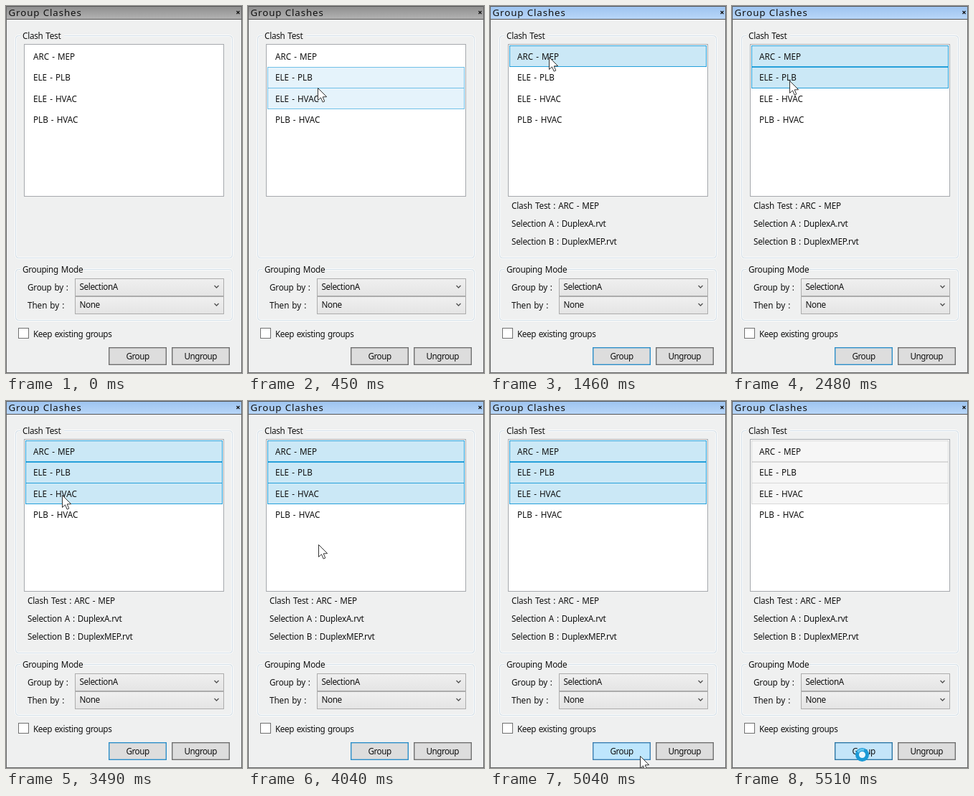
An HTML page with a canvas for the animation above (5590 ms loop, 329 by 512 pixels).

```html
<!DOCTYPE html>
<html lang="en">
<head>
<meta charset="utf-8">
<title>Group Clashes</title>
<style>
html, body { margin: 0; width: 100%; height: 100%; overflow: hidden; background: #eff0f0; }
canvas { display: block; width: 329px; height: 512px; }
</style>
</head>
<body>
<canvas id="stage" width="329" height="512"></canvas>
<script>
const ctx = document.getElementById('stage').getContext('2d');
const LOOP = 5590;
const ROWS = ['ARC - MEP', 'ELE - PLB', 'ELE - HVAC', 'PLB - HVAC'];
const ROW_TOPS = [55, 85, 114, 144];
const SELECT_TIMES = [1460, 2480, 3490, Infinity];
const ACTIVATE = 1460, PRESS = 5210, BUSY = 5510;

const easeOut = u => 1 - (1 - u) ** 2.4;
const linear = u => u;
const soft = u => (u + u * u * (3 - 2 * u)) / 2;

// Each move shows `steps` poses, the first at `start` and the last at `end`.
const MOVES = [
  { start: 130, end: 680, steps: 8, from: [184, 404], to: [84, 70], ease: easeOut, shown: true },
  { start: 760, end: 760, steps: 1, to: [82, 71] },
  { start: 1690, end: 1690, steps: 1, to: [80, 112] },
  { start: 1780, end: 1780, steps: 1, to: [80, 104] },
  { start: 2780, end: 2860, steps: 2, from: [80, 104], to: [78, 131], ease: linear },
  { start: 3960, end: 4510, steps: 8, from: [78, 131], to: [175, 472], ease: soft },
  { start: 4580, end: 4740, steps: 3, from: [175, 472], to: [181, 492], ease: easeOut },
  { start: 4970, end: 5040, steps: 2, from: [181, 492], to: [209, 495], ease: linear }
];

function cursorAt(t) {
  const move = MOVES.filter(m => t >= m.start).pop();
  if (!move) return null;
  const { start, end, steps, from, to, ease } = move;
  if (steps === 1) return to;
  const gap = (end - start) / (steps - 1);
  const i = Math.min(steps - 1, Math.floor((t - start) / gap + 0.06));
  const u = ease(move.shown ? i / (steps - 1) : (i + 1) / steps);
  return from.map((v, k) => Math.round(v + (to[k] - v) * u));
}

const inside = (p, x, y, w, h) => p && p[0] >= x && p[0] < x + w && p[1] >= y && p[1] < y + h;

function text(str, x, y, spacing = 0, size = 11.7, words = 1) {
  ctx.font = `${size}px "Noto Sans", "Open Sans", sans-serif`;
  ctx.letterSpacing = spacing + 'px';
  ctx.wordSpacing = words + 'px';
  ctx.fillStyle = '#111';
  ctx.fillText(str, x, y);
}

function box(x, y, w, h, fill, stroke, line = 1) {
  ctx.fillStyle = fill;
  ctx.fillRect(x, y, w, h);
  ctx.strokeStyle = stroke;
  ctx.lineWidth = line;
  ctx.strokeRect(x + line / 2, y + line / 2, w - line, h - line);
}

function shade(y, h, top, bottom) {
  const g = ctx.createLinearGradient(0, y, 0, y + h);
  g.addColorStop(0, top);
  g.addColorStop(1, bottom);
  return g;
}

function groupBox(label, y, h, labelWidth) {
  const outline = (inset, color) => {
    ctx.beginPath();
    ctx.roundRect(13.5 + inset, y + 0.5 + inset, 302 - 2 * inset, h - 2 * inset, 4 - inset);
    ctx.strokeStyle = color;
    ctx.stroke();
  };
  ctx.lineWidth = 1;
  outline(-1, '#fbfcfc');
  outline(1, '#fbfcfc');
  outline(0, '#d2dee8');
  ctx.fillStyle = '#eff0f0';
  ctx.fillRect(20, y - 2, labelWidth, 5);
  text(label, 23, y + 5, -0.25);
}

function combo(value, y, hover) {
  const fill = hover ? shade(y, 25, '#ecf4fc', '#dcecfc') : shade(y, 25, '#f0f0f0', '#e4e4e4');
  box(96, y, 208, 25, fill, hover ? '#7eb4ea' : '#acacac');
  text(value, 102.5, y + 15.5, -0.38);
  ctx.beginPath();
  ctx.moveTo(290.5, y + 10);
  ctx.lineTo(293.5, y + 13);
  ctx.lineTo(296.5, y + 10);
  ctx.strokeStyle = '#505050';
  ctx.lineWidth = 1.3;
  ctx.stroke();
}

function titleBar(active) {
  ctx.fillStyle = active ? shade(0, 18, '#9cc3ef', '#b8d6f8') : shade(0, 18, '#8d8d8d', '#b2b2b2');
  ctx.fillRect(0, 0, 329, 18);
  ctx.fillStyle = '#555';
  ctx.fillRect(0, 0, 329, 1);
  ctx.fillRect(0, 18, 329, 1);
  text('Group Clashes', 3.5, 14, 0.9, 13.3, 0);
  ctx.beginPath();
  ctx.moveTo(321.5, 7);
  ctx.lineTo(325.5, 11);
  ctx.moveTo(325.5, 7);
  ctx.lineTo(321.5, 11);
  ctx.strokeStyle = '#111';
  ctx.lineWidth = 1.2;
  ctx.stroke();
}

function list(t, pointer) {
  box(25, 53, 279, 213, '#fff', '#a6a9ad');
  ROWS.forEach((name, i) => {
    const top = ROW_TOPS[i];
    const selected = t >= SELECT_TIMES[i];
    if (selected && t >= PRESS) box(27, top, 275, 30, '#f6f6f6', '#d9d9d9');
    else if (selected) box(27, top, 275, 30, '#cbe8f6', '#26a0da');
    else if (inside(pointer, 27, top, 275, 30)) box(27, top, 275, 30, '#e5f3fb', '#70c0e7');
  });
  ROWS.forEach((name, i) => text(name, 38, [75, 104, 134, 163][i], 0));
}

function buttons(t, pointer) {
  let fill = '#dddddd', stroke = '#707070';
  if (t >= ACTIVATE) stroke = '#2d8fc9';
  if (inside(pointer, 143, 476, 81, 25)) [fill, stroke] = ['#bee6fd', '#3c7fb1'];
  if (t >= PRESS) [fill, stroke] = ['#c4e5f9', '#2f78a6'];
  box(143, 476, 81, 25, fill, stroke, 1.4);
  box(231, 476, 81, 25, '#dddddd', '#707070', 1.4);
  text('Group', 167.5, 493, -0.5);
  text('Ungroup', 248.5, 493, -0.5);
}

function arrow([x, y]) {
  ctx.save();
  ctx.translate(x + 0.5, y + 0.5);
  ctx.beginPath();
  [[0, 0], [0, 17], [4, 13.4], [6.7, 19.6], [9.3, 18.5], [6.7, 12.4], [12.2, 12.2]]
    .forEach(p => ctx.lineTo(...p));
  ctx.closePath();
  ctx.fillStyle = '#fff';
  ctx.fill();
  ctx.strokeStyle = '#333';
  ctx.lineWidth = 1;
  ctx.stroke();
  ctx.restore();
}

function spinner(x, y) {
  const ring = (a, b, color, width) => {
    ctx.beginPath();
    ctx.arc(x, y, 7, a, b);
    ctx.strokeStyle = color;
    ctx.lineWidth = width;
    ctx.stroke();
  };
  ctx.beginPath();
  ctx.arc(x, y, 5, 0, 2 * Math.PI);
  ctx.fillStyle = '#eaf7fe';
  ctx.fill();
  ring(0, 2 * Math.PI, '#1c9ad6', 5);
  ring(-2.6, -1.2, '#67c8f0', 3);
}

function draw(t) {
  const pointer = cursorAt(t);
  ctx.fillStyle = '#eff0f0';
  ctx.fillRect(0, 0, 329, 512);
  titleBar(t >= ACTIVATE);

  groupBox('Clash Test', 41, 310, 61);
  list(t, pointer);
  if (t >= ACTIVATE) {
    text('Clash Test : ARC - MEP', 30, 283, -0.15);
    text('Selection A : DuplexA.rvt', 30, 308, -0.2);
    text('Selection B : DuplexMEP.rvt', 30, 333, -0.2);
  }

  groupBox('Grouping Mode', 367, 71, 87);
  text('Group by :', 30, 397, -0.2);
  text('Then by :', 30, 422, -0.05);
  combo('SelectionA', 380, inside(pointer, 96, 380, 208, 25));
  combo('None', 405, inside(pointer, 96, 405, 208, 25));

  box(17, 449, 15, 15, '#fff', '#707070');
  text('Keep existing groups', 38, 462, -0.4);
  buttons(t, pointer);

  ctx.fillStyle = '#666';
  ctx.fillRect(0, 0, 1, 512);
  ctx.fillRect(328, 0, 1, 512);
  ctx.fillRect(0, 511, 329, 1);

  if (t >= BUSY) spinner(181.5, 493.5);
  else if (pointer) arrow(pointer);
}

const begin = performance.now();
function frame() {
  draw((performance.now() - begin) % LOOP);
  requestAnimationFrame(frame);
}
frame();
</script>
</body>
</html>
```
